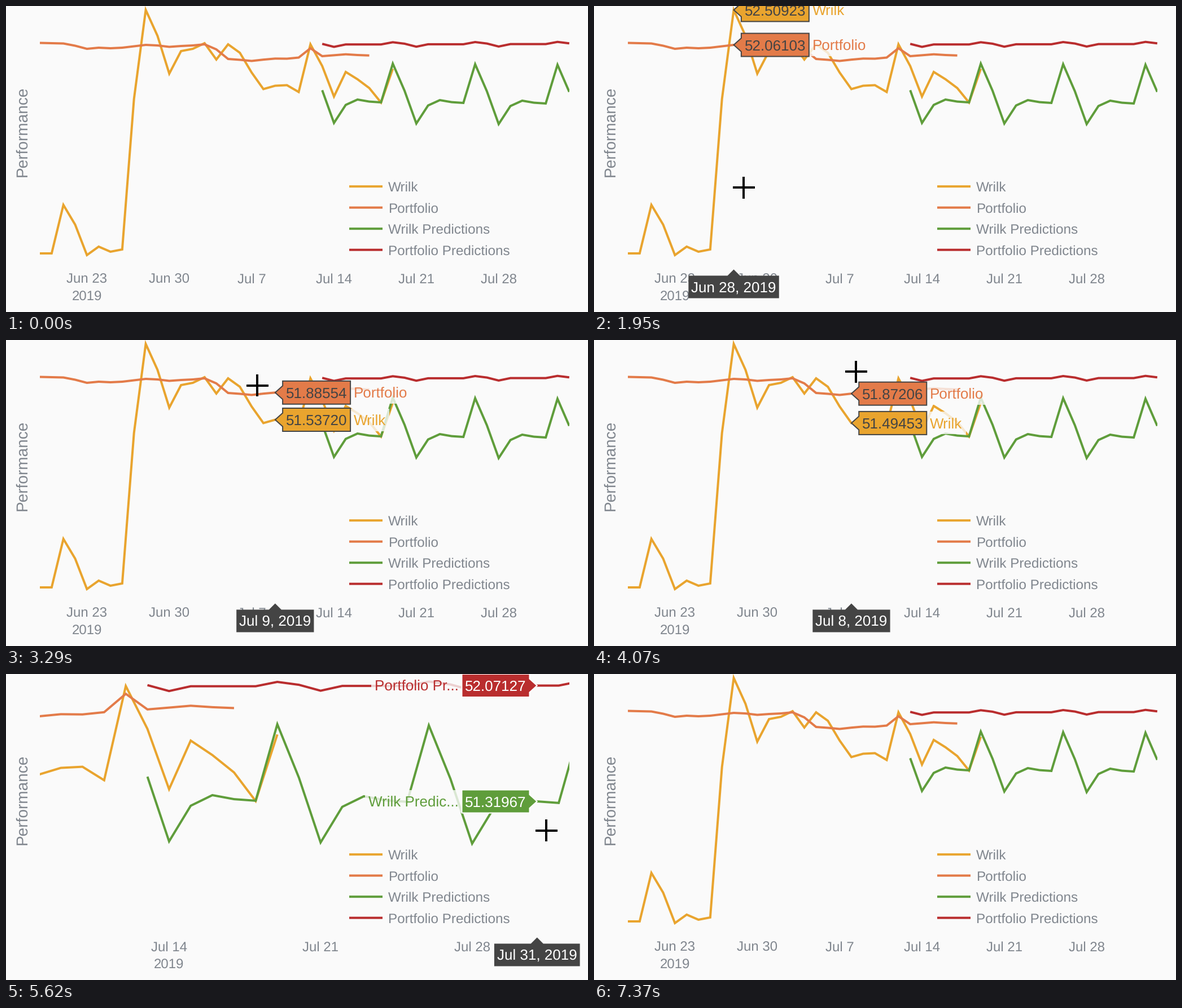
A matplotlib script for the animation above (8000 ms loop, 1031 by 543 pixels).

```python
import itertools

import numpy as np
import matplotlib.pyplot as plt
from matplotlib.animation import FuncAnimation
from matplotlib.colors import to_rgb
from matplotlib.patches import Circle, Polygon, Rectangle

W, H, DPI = 1031, 543, 64
PT = 72 / DPI  # points per pixel
LOOP, TICK = 8000, 40

BG, GREY, DARK = "#fafafa", "#80868e", "#444444"
LEFT, RIGHT, BOTTOM = 60, 998, 466
DAY = 20.84
ZOOM_X, ZOOM_Y = (456.6, 1.84), (57.2, 1.976)  # origin, scale
HOT = 8  # offset from cursor centre to its hot spot
MONTHS = (("Jun", 19, 0), ("Jul", 1, 12), ("Aug", 1, 43))

APPEAR, PRESS, DRAG, RELEASE = 950, 4410, 4530, 5500
CLICK, RESET, LAST_HOVER, LEAVE = 6610, 6940, 7270, 7370

index = [439, 439, 353, 388, 442, 427, 436, 432, 165, 7, 53, 120, 80, 76, 66,
         95, 68, 83, 118, 147.4042, 141.5, 140.5, 152.6, 68, 106.5, 160.6296,
         117, 130, 145.6, 171.3, 111.5]
fund = [65.5, 66, 66.5, 70.5, 76, 74, 75, 74, 71.5, 69.0176, 70, 72.5, 71, 70,
        68, 77, 94, 95.5, 97.5, 95.1653, 93.3, 93.5, 91.5, 75, 89, 87.371,
        85.7, 87, 87.8]


def weekly(pattern, drift):
    return [pattern[i % 7] + drift * (i // 7) for i in range(22)]


# name, colour, label ink, first day, heights
TRACES = [
    ("Wrilk", "#e9a42e", DARK, 0, index),
    ("Portfolio", "#e37b49", DARK, 0, fund),
    ("Wrilk Predictions", "#5f9d3b", "#ffffff", 24,
     weekly([149.4, 207.5, 175.5, 166, 169.6, 171, 102.3], 1)),
    ("Portfolio Predictions", "#b92d2e", "#ffffff", 24,
     weekly([67.2, 72.5142, 68.2, 68.2, 68.2, 68.2, 64.3], -0.3)),
]

# turning points of the cursor: time, x, y
PATH = np.array([
    (950, 620, 530), (1180, 480, 465), (1410, 316, 415), (1700, 250, 352),
    (1870, 265, 322), (2150, 350, 235), (2620, 607, 138), (2880, 698, 118),
    (3500, 316, 62), (3800, 640, 60), (4000, 464, 56), (4500, 464, 56),
    (4854, 809, 265), (5200, 972, 301), (5500, 972, 301), (6256, 870, 138),
    (6390, 870, 131), (7150, 870, 131), (7270, 884, 140)])

# the screen refreshes in bursts of eight steps
BURSTS = np.array([0, 950, 1870, 2750, 3630, 4530, 5500, 6390, 7270])
STEP = 108

plt.rcParams.update({"text.hinting": "none", "font.family": "Liberation Sans"})
fig = plt.figure(figsize=(W / DPI, H / DPI), dpi=DPI, facecolor=BG)
ax = fig.add_axes([0, 0, 1, 1])
ax.set_xlim(0, W)
ax.set_ylim(H, 0)
ax.axis("off")
plot_area = Rectangle((LEFT, -20), RIGHT - LEFT, BOTTOM + 20, transform=ax.transData)

live = []
layer = itertools.count(1)


def keep(artist):
    live.append(artist)
    return artist


def shape(patch):
    patch.set_zorder(next(layer))
    return keep(ax.add_patch(patch))


def box(x, y, w, h, color, alpha=1):
    return shape(Rectangle((x, y), w, h, fc=color, lw=0, alpha=alpha))


def poly(pts, fill, edge="none", lw=0):
    return shape(Polygon(pts, closed=True, fc=fill, ec=edge, lw=lw * PT,
                         joinstyle="miter"))


def line(xs, ys, color):
    return keep(ax.plot(xs, ys, color=color, lw=4 * PT, zorder=next(layer), snap=False,
                        solid_capstyle="butt", solid_joinstyle="miter")[0])


def text(x, y, s, size, color, ha="left", **kw):
    return keep(ax.text(x, y, s, fontsize=size * PT, color=color, ha=ha,
                        va="baseline", zorder=next(layer), **kw))


def text_width(t):
    return t.get_window_extent(fig.canvas.get_renderer()).width * DPI / fig.dpi


def to_x(day, zoom):
    x = LEFT + DAY * np.asarray(day, float)
    return (x - ZOOM_X[0]) * ZOOM_X[1] + LEFT if zoom else x


def to_y(y, zoom):
    y = np.asarray(y, float)
    return (y - ZOOM_Y[0]) * ZOOM_Y[1] if zoom else y


def to_day(x, zoom):
    if zoom:
        x = (x - LEFT) / ZOOM_X[1] + ZOOM_X[0]
    return int(round((x - LEFT) / DAY))


def date(day):
    name, first, start = [m for m in MONTHS if m[2] <= day][-1]
    return f"{name} {first + day - start}"


def chart(zoom):
    for _, color, _, start, ys in TRACES:
        days = start + np.arange(len(ys))
        line(to_x(days, zoom), to_y(ys, zoom), color).set_clip_path(plot_area)
    for i, (name, color, *_) in enumerate(TRACES):
        y = 320.2 + 37.5 * i
        line([608, 667], [y, y], color)
        text(677, y + 8.7, name, 24.2, GREY)
    ticks = [d for d in range(4, 45, 7) if LEFT < to_x(d, zoom) < RIGHT]
    for d in ticks:
        text(to_x(d, zoom), 492, date(d), 24, GREY, "center")
    text(to_x(ticks[0], zoom), 522.5, "2019", 24, GREY, "center")
    text(36.5, 223, "Performance", 28, GREY, "center",
         rotation=90, rotation_mode="anchor")


def spread(ys, gap):
    """Push sorted label centres apart so that none overlap."""
    blocks = []
    for i, y in enumerate(ys):
        blocks.append([y - gap * i, 1])
        while len(blocks) > 1 and blocks[-2][0] > blocks[-1][0]:
            (a, n), (b, m) = blocks[-2:]
            blocks[-2:] = [[(a * n + b * m) / (n + m), n + m]]
    flat = [v for v, n in blocks for _ in range(n)]
    return [v + gap * i for i, v in enumerate(flat)]


def hover(day, zoom):
    """Draw value labels and the date; return the label boxes."""
    x = float(to_x(day, zoom))
    hits = sorted((float(to_y(ys[day - start], zoom)), ys[day - start], name, color, ink)
                  for name, color, ink, start, ys in TRACES
                  if 0 <= day - start < len(ys))
    side = -1 if x + 300 > W else 1
    ha = "left" if side > 0 else "right"
    boxes = []
    for (y, raw, name, color, ink), c in zip(hits, spread([h[0] for h in hits], 42)):
        short = name if len(name) <= 15 else name[:12] + "..."
        a, b = x + side * 13.3, x + side * 133.3
        label = text(b + side * 6, c + 9.3, short, 26, color, ha)
        w = text_width(label) + 12
        box(min(b, b + side * w), c - 20, w, 40, BG, 0.8)
        label.set_zorder(next(layer))
        poly([(x, y), (a, c - 12), (a, c - 20.5), (b, c - 20.5),
              (b, c + 20.5), (a, c + 20.5), (a, c + 12)], color, ink, 2)
        text((a + b) / 2, c + 9.3, f"{52.55982 - 0.007227 * raw:.5f}", 26, ink, "center")
        boxes.append((min(a, b), c - 20.5, 120, 41, color))
    label = text(x, 507.5, date(day) + ", 2019", 26, "white", "center")
    w = text_width(label) / 2 + 5
    poly([(x, 467.5), (x + 11, 478.5), (x + w, 478.5), (x + w, 518.5),
          (x - w, 518.5), (x - w, 478.5), (x - 11, 478.5)], DARK)
    label.set_zorder(next(layer))
    return boxes


def select(x0, y0, x1, y1):
    for x, y, w, h in ((LEFT, 0, RIGHT - LEFT, y0),
                       (LEFT, y1, RIGHT - LEFT, BOTTOM - y1),
                       (LEFT, y0, x0 - LEFT, y1 - y0),
                       (x1, y0, RIGHT - x1, y1 - y0)):
        box(x, y, w, h, "black", 0.41).set_antialiased(False)
    corner = np.array([(-6, -6), (19, -6), (19, 0), (0, 0), (0, 19), (-6, 19)])
    for x, sx in ((x0, 1), (x1, -1)):
        for y, sy in ((y0, 1), (y1, -1)):
            poly(corner * (sx, sy) + (x, y), "white", DARK, 2)


def cross(x, y, color, clip=None):
    for w, h in ((39, 4), (4, 39)):
        bar = box(x - w / 2, y - h / 2, w, h, color)
        if clip:
            bar.set_clip_path(Rectangle(clip[:2], *clip[2:], transform=ax.transData))


def cursor_at(t):
    return [float(np.interp(t, PATH[:, 0], PATH[:, i])) for i in (1, 2)]


def refreshed(t):
    start = BURSTS[BURSTS <= t].max()
    return start + STEP * min((t - start) // STEP, 7)


def draw(k):
    while live:
        live.pop().remove()
    t = k * TICK + TICK - 1
    zoom = RELEASE <= t < RESET
    dragging = DRAG <= t < RELEASE
    pressed = PRESS <= t < RELEASE or CLICK <= t < RESET
    chart(zoom)
    seen = refreshed(t)
    x, y = cursor_at(seen)
    if not APPEAR <= t < LEAVE or y - HOT > BOTTOM:
        return live
    boxes = []
    if t < PRESS or RELEASE + STEP <= t < CLICK or t >= LAST_HOVER:
        # labels trail the cursor slightly
        boxes = hover(to_day(cursor_at(seen - 60)[0] - HOT, zoom), zoom)
    if dragging:
        select(457, 48, x - HOT, y - HOT)
    cross(x, y, "#6b6b6b" if dragging else "black")
    for *rect, color in boxes:
        cross(x, y, 1 - np.array(to_rgb(color)), rect)
    if pressed:
        shape(Circle((x, y - 1), 23.5, fc="#ffff00", lw=0, alpha=0.5))
    return live


anim = FuncAnimation(fig, draw, frames=LOOP // TICK, interval=TICK,
                     init_func=lambda: draw(0), repeat=True, repeat_delay=0,
                     blit=False, cache_frame_data=False)
plt.show()
```
